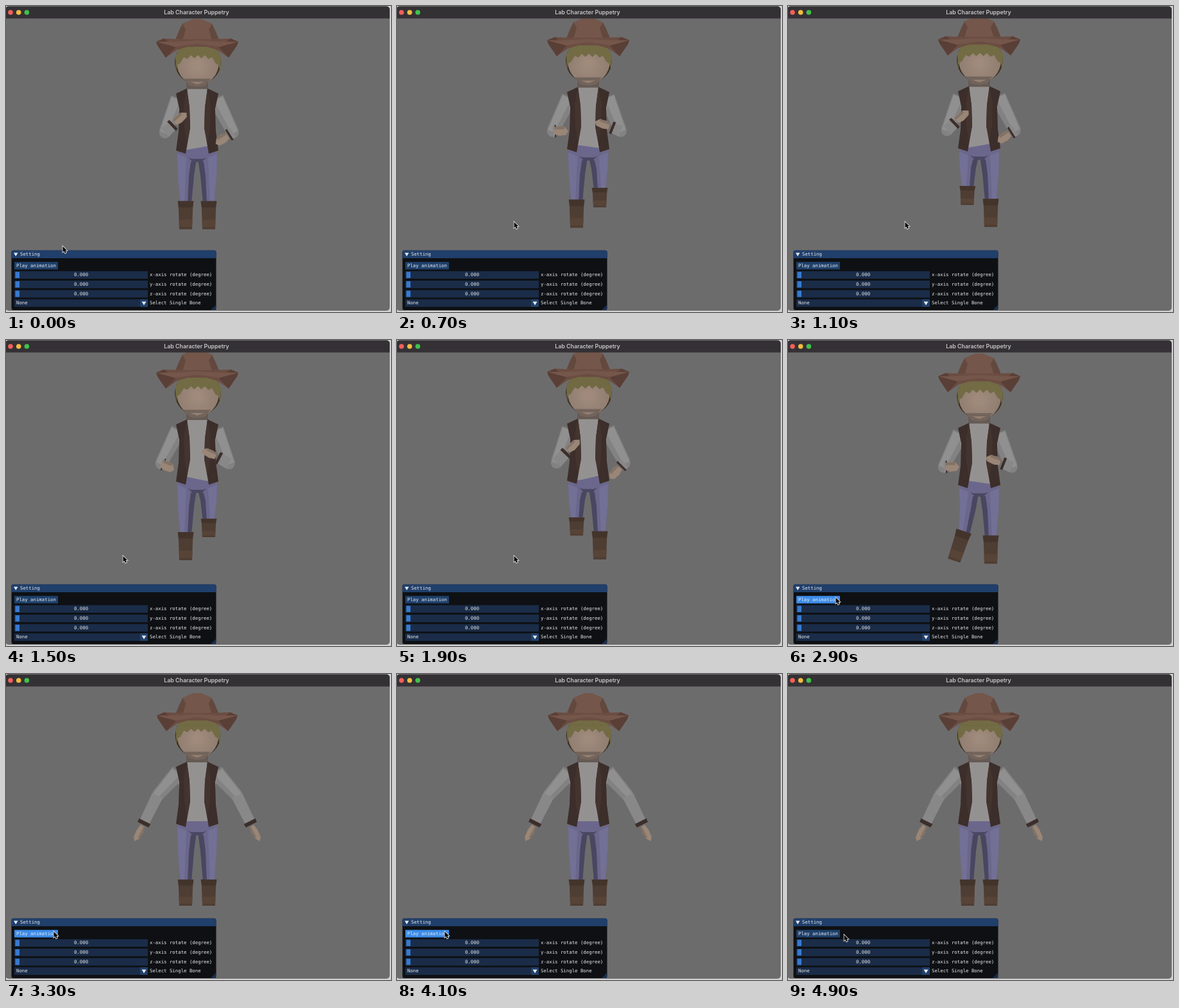
Recreate the animation shown at these times as an HTML page with a canvas. Size 600x478 px, loop 5 s.

```html
<!DOCTYPE html>
<html lang="en">
<head>
<meta charset="utf-8">
<style>
html, body { margin: 0; width: 100%; height: 100%; overflow: hidden; background: #d2d1d2; }
canvas { display: block; width: 600px; height: 478px; }
</style>
</head>
<body>
<canvas id="stage" width="600" height="478"></canvas>
<script>
const g = document.getElementById('stage').getContext('2d');
const LOOP = 5000, STEP = 100, RUN = 2500 / 3, STOP = 3000, MID = 298, TAU = 2 * Math.PI;
const SKIN = '#9a8676', PANTS = '#6b678c', VEST = '#3c2e2a', WHITE = '#e6e9ec';

const pointer = [[0, 88, 375], [500, 182, 337], [1900, 182, 337], [2300, 95, 390],
  [2600, 74, 402], [4500, 74, 402], [4800, 87, 407], [LOOP, 87, 407]];

const mix = (a, b, k) => a.map((v, i) => v + (b[i] - v) * k);
function pointerAt(t) {
  const i = Math.max(1, pointer.findIndex(k => k[0] >= t));
  const [a, b] = [pointer[i - 1], pointer[i]];
  return mix(a, b, (t - a[0]) / (b[0] - a[0])).slice(1);
}

// Points given as distance from the middle line, for side s (-1 left, 1 right)
const side = (s, pts) => pts.map((v, i) => i % 2 ? v : MID + s * v);

function path(pts) {
  g.beginPath();
  for (let i = 0; i < pts.length; i += 2) g.lineTo(pts[i], pts[i + 1]);
  g.closePath();
}
function poly(color, pts) {
  path(pts);
  g.fillStyle = color;
  g.fill();
}
function both(color, ...pts) {
  for (const s of [-1, 1]) poly(color, side(s, pts));
}
function sym(color, ...pts) {
  const left = [];
  for (let i = pts.length - 2; i >= 0; i -= 2) left.push(MID - pts[i], pts[i + 1]);
  poly(color, [...side(1, pts), ...left]);
}
function rect(color, x, y, w, h, r = 0) {
  g.fillStyle = color;
  g.beginPath();
  g.roundRect(x, y, w, h, r);
  g.fill();
}
function oval(color, x, y, rx, ry = rx) {
  g.fillStyle = color;
  g.beginPath();
  g.ellipse(x, y, rx, ry, 0, 0, TAU);
  g.fill();
}
function label(str, x, y, align = 'left', color = WHITE, font = '7.35px "DejaVu Sans Mono", monospace') {
  g.font = font;
  g.textAlign = align;
  g.textBaseline = 'middle';
  g.fillStyle = color;
  g.fillText(str, x, y);
}
function limb(color, [x0, y0], [x1, y1], w0, w1) {
  const d = Math.hypot(x1 - x0, y1 - y0) || 1;
  const u = (y0 - y1) / d / 2, v = (x1 - x0) / d / 2;
  poly(color, [x0 + u * w0, y0 + v * w0, x1 + u * w1, y1 + v * w1,
    x1 - u * w1, y1 - v * w1, x0 - u * w0, y0 - v * w0]);
}

// Joints of one side, relative to the body
const restSide = s => ({
  elbow: side(s, [62, 181]), hand: side(s, [91, 240]),
  top: side(s, [18, 312]), toe: side(s, [18, 353])
});
function runSide(s, phase, swing) {
  const q = s * swing, a = TAU * (phase + (s > 0 ? .5 : 0));
  const lift = Math.max(0, Math.sin(a));
  const kick = (1 - s) * Math.max(0, -Math.cos(a)) ** 4;   // left foot flicks outwards
  return {
    elbow: side(s, [53 - 4 * q, 197]),
    hand: side(s, [32 - 13 * q - 3 * s, 191 + 4.5 * s - 18 * q]),
    top: side(s, [18 + 3 * kick, 304 - 22 * lift - 2 * kick]),
    toe: side(s, [18 + 11 * kick, 348 - 38 * lift])
  };
}
function pose(t) {
  if (t > STOP) return { y: 9, swing: 0, left: restSide(-1), right: restSide(1) };
  const phase = t / RUN % 1;
  const swing = 1.3 * Math.cos(TAU * (phase - .66));
  return {
    y: -3 - 5 * Math.cos(2 * TAU * (phase - .69)), swing,
    left: runSide(-1, phase, swing), right: runSide(1, phase, swing)
  };
}

function leg(s, { top, toe }) {
  const a = s * (top[0] - MID), y = top[1] + 4, knee = 229 + (y - 229) * .45;
  poly(PANTS, side(s, [0, 222, 32, 228, 30, knee, a + 9, y, a - 9, y, 5, knee, 2, 240]));
  poly('#494660', side(s, [1, 238, 10, 243, 13, knee, a - 3, y, a - 9, y, 5, knee]));
  poly('#737096', side(s, [17, 236, 31, 230, 30, knee, a + 8, y, a + 2, y]));
  limb('#4e3d32', top, toe, 23, 20);
  limb('#43342b', top, mix(top, toe, .23), 25, 22);
  limb('#574437', mix(top, toe, .66), mix(top, toe, .92), 21, 20);
}

function upperArm(s, { elbow }) {
  const shoulder = side(s, [29, 144]);
  limb('#838282', shoulder, elbow, 25, 19);
  oval('#838282', ...elbow, 9);
  limb('#919090', side(s, [33, 144]), [elbow[0] + s * 3, elbow[1]], 15, 10);
}

function foreArm(s, { elbow, hand }) {
  const dx = hand[0] - elbow[0], dy = hand[1] - elbow[1], d = Math.hypot(dx, dy);
  const wrist = mix(hand, elbow, Math.min(15, d * .6) / d);
  const k = Math.min(1, d / 60);
  limb('#898888', elbow, wrist, 18, 16);
  limb(VEST, mix(wrist, elbow, Math.min(.4, 8 / d)), wrist, 20, 19);
  g.save();
  g.translate(...hand);
  g.rotate(Math.atan2(dy, dx));
  g.scale(.95 + .3 * k, s * (1.05 - .4 * k));
  poly(SKIN, [-11, -5, -3, -8, 7, -7, 11, -1, 6, 6, -3, 8, -10, 6]);
  limb('#837265', [-10, 5], [5, 5], 4, 5);
  g.restore();
}

function torso(tilt) {
  sym('#655a54', 17, 117, 17, 132, 0, 138);
  sym('#949291', 17, 129, 0, 134, 0, 134, 17, 129, 31, 142, 27, 180, 20, 224);
  sym('#4a4762', 20, 230, 7, 243);
  poly(PANTS, side(1, [-20, 221 - tilt / 2, 20, 221 + tilt / 2, 31, 229, 9, 238, -9, 238, -31, 229]));
  both(VEST, 16, 128, 12, 158, 11, 190, 18, 230, 33, 225, 29, 195, 28, 160, 33, 136);
  both('#44342f', 16, 128, 12, 158, 11, 190, 16, 215, 20, 190, 21, 155);
}

function hair() {
  g.save();
  const pts = [265, 104, 264, 78, 270, 65, 298, 58, 327, 65, 335, 78, 334, 104];
  for (let i = 0; i <= 12; i++) {
    const u = 1 - i / 6;
    pts.push(299 + 33 * u, 76 + 16 * u ** 4 + (i % 2 ? 5 : 0));
  }
  path(pts);
  g.fillStyle = '#777047';
  g.fill();
  g.clip();
  for (let y = 58; y < 106; y += 2)
    for (let x = 264 + y % 4 / 2; x < 337; x += 2.5) rect('#575034', x, y, 1, .8);
  g.restore();
}

function hat() {
  sym('#63483e', 6, 20, 23, 27, 28, 37, 35, 54, 0, 60);
  sym('#74564a', 6, 20, 23, 27, 18, 36, 24, 56);
  sym('#6b4d42', 30, 51, 52, 50, 64, 55, 62, 61, 49, 80, 32, 68, 15, 63);
  both('#593f36', 52, 50, 64, 55, 62, 61, 49, 80, 34, 64);
  sym('#75564a', 0, 53, 34, 55, 64, 55, 35, 63, 0, 58);
}

function head() {
  oval('#3b3426', 299, 87, 36, 35);
  const shade = g.createRadialGradient(298, 92, 6, 298, 94, 38);
  shade.addColorStop(0, '#9f8a7b');
  shade.addColorStop(1, '#8d7b6f');
  oval(shade, 299, 87, 33, 36);
  sym('#73645b', 21, 113, 12, 124, 0, 126, 0, 122, 11, 118);
  hair();
  hat();
}

function figure({ y, swing, left, right }) {
  g.save();
  g.translate(0, y);
  leg(-1, left);
  leg(1, right);
  upperArm(-1, left);
  upperArm(1, right);
  torso(10 * swing);
  foreArm(-1, left);
  foreArm(1, right);
  // The head shrinks slightly as it sinks away from the camera
  const size = 1 - Math.max(0, y) * .002;
  g.translate(MID, 90);
  g.scale(size, size);
  g.translate(-MID, -90);
  head();
  g.restore();
}

function titleBar() {
  rect('#343135', 0, 0, 598, 19.5);
  ['#f4605a', '#f5bd3f', '#3fc24b'].forEach((c, i) => oval(c, 7 + i * 12.7, 10, 3.8));
  label('Lab Character Puppetry', 297, 10, 'center', '#c8c5c8', '600 8.8px Inter, sans-serif');
}

function panel(hover) {
  rect('#0e1013', 8.5, 381.8, 319, 93.2, 3);
  rect('#203f6b', 8.5, 381.8, 319, 12.2, [3, 3, 0, 0]);
  poly(WHITE, [12, 385.5, 18.5, 385.5, 15.2, 391]);
  label('Setting', 22, 388.5);
  rect(hover ? '#3c8ce9' : '#1f406b', 13, 399.7, 68, 11.7);
  label('Play animation', 16, 405.8);
  ['x', 'y', 'z'].forEach((axis, i) => {
    const y = 414.3 + i * 14.7;
    rect('#1a2c48', 13, y, 208, 11.7);
    rect('#367ad0', 14.5, y + 1, 6.5, 9.7);
    label('0.000', 117, y + 6, 'center');
    label(axis + '-axis rotate (degree)', 224, y + 6);
  });
  rect('#1a2c48', 13, 458.3, 208, 11.7);
  rect('#21416b', 209, 458.3, 12, 11.7);
  poly(WHITE, [211.5, 461.8, 218.5, 461.8, 215, 467.5]);
  label('None', 16, 464.3);
  label('Select Single Bone', 224, 464.3);
  poly('#182f50', [327, 467, 327, 475, 319, 475]);
}

function arrow(x, y) {
  g.save();
  g.translate(x + .5, y + .5);
  path([0, 0, 0, 9, 2, 7.2, 3.6, 10.6, 5.4, 9.8, 4, 6.5, 6.6, 6.4]);
  g.lineWidth = 1.6;
  g.strokeStyle = '#e8e8e8';
  g.stroke();
  g.fillStyle = '#050505';
  g.fill();
  g.restore();
}

function draw(now) {
  const t = Math.floor(now % LOOP / STEP) * STEP;
  const [mx, my] = pointerAt(t);
  rect('#d2d1d2', 0, 0, 600, 478);
  g.save();
  g.beginPath();
  g.roundRect(-1, .5, 599, 475.5, 5);
  g.clip();
  rect('#6d6c6d', 0, 0, 600, 478);
  figure(pose(t));
  titleBar();
  panel(mx > 13 && mx < 81 && my > 399 && my < 412);
  arrow(mx, my);
  g.restore();
}

let start;
function tick(now) {
  start ??= now;
  draw(now - start);
  requestAnimationFrame(tick);
}
draw(0);
requestAnimationFrame(tick);
</script>
</body>
</html>
```
